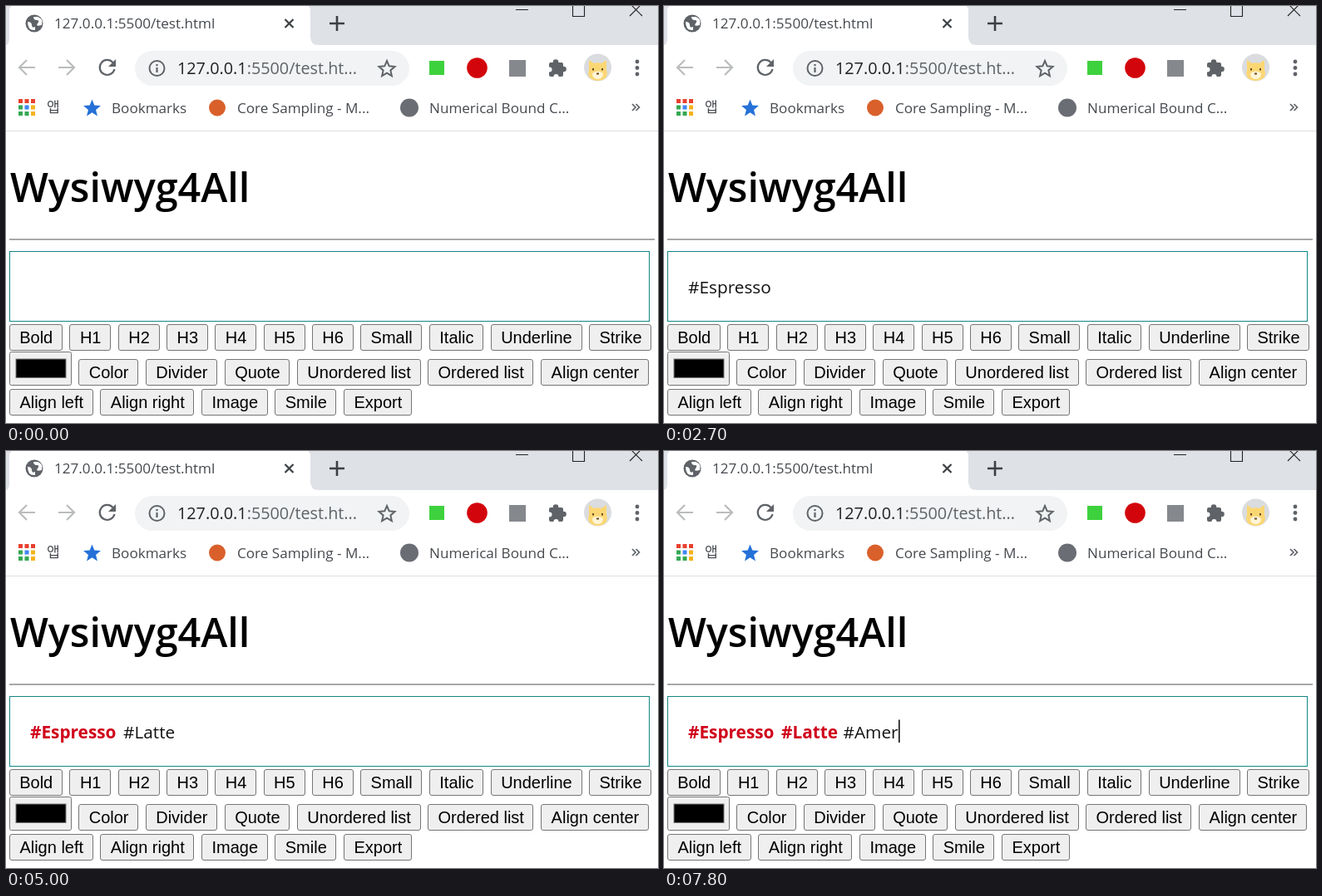
Recreate the animation shown at these times as an HTML page. Size 784 px wide and 502 px high, loop 8000 ms.

```html
<!DOCTYPE html>
<html lang="en">
<head>
<meta charset="utf-8">
<title>Editor demo</title>
<style>
  html, body { margin: 0; width: 100%; height: 100%; overflow: hidden; background: #fff; }
  svg { display: block; width: 784px; height: 502px; }
  text { white-space: pre; font-family: "Open Sans", "Noto Sans", "Noto Sans CJK KR", sans-serif; }
  .label { font-size: 17.1px; fill: #45494e; }
  .url { font-size: 19.8px; fill: #202124; }
  .heading { font-size: 48.5px; font-weight: 640; }
  .word { font-size: 20.8px; fill: #111; }
  .word.tag { font-weight: 700; fill: #d0021b; }
  .button text { font: 20px "Liberation Sans", Arial, sans-serif; }
  .button rect { fill: #efefef; stroke: #767676; }
  .line { fill: none; stroke: #5f6368; stroke-width: 2.2; }
  .faint { stroke: #babcbe; }
  .icon { fill: #5f6368; }
</style>
</head>
<body>
<svg id="stage" viewBox="0 0 784 502">
  <rect width="784" height="502" fill="#fff"/>

  <!-- Tab strip -->
  <rect width="784" height="47" fill="#dee1e6"/>
  <path d="M0 47Q4 46 4 39V6Q4 0 10 -2H360Q366 0 366 6V37Q366 47 376 47Z" fill="#fff"/>
  <circle class="icon" cx="34" cy="21" r="10.5"/>
  <path d="M26 19q5 0 5 4t4 2v4q-9 1 -9 -10M33 13q0 4 4 4t1 4t5 2q2 -8 -5 -10z" fill="#fff"/>
  <text class="label" x="58" y="27">127.0.0.1:5500/test.html</text>
  <path class="line" d="M335.500 16l10 10m0 -10l-10 10" style="stroke:#3c4043"/>
  <path class="line" d="M389 21h18M398 12v18" style="stroke:#3c4043;stroke-width:2.6"/>
  <path d="M613 4.500h15M681.500 -2v14.500h14V-2M750 -3l15 15m0 -15l-15 15" fill="none" stroke="#222" stroke-width="1.100"/>

  <!-- Toolbar -->
  <path class="line faint" d="M35 74H16m9 -9l-9 9l9 9M63 74h19m-9 -9l9 9l-9 9"/>
  <path class="line" d="M128.500 68a9 9 0 1 0 2 8"/>
  <path class="icon" d="M132 64v9h-9z"/>
  <rect x="155" y="54" width="330" height="42" rx="21" fill="#f1f3f4"/>
  <circle class="line" cx="181.500" cy="75" r="9" style="stroke-width:2"/>
  <path class="line" d="M181.500 74v6m0 -10v2.200"/>
  <text class="url" x="206" y="82">127.0.0.1<tspan fill="#5f6368">:5500/test.ht...</tspan></text>
  <path class="line" id="outlineStar" style="stroke-width:2"/>
  <rect x="509" y="66" width="18" height="17" fill="#3ed13e"/>
  <circle cx="566.500" cy="74.500" r="12.300" fill="#d3050c"/>
  <rect x="605" y="65" width="20" height="20" fill="#85888c"/>
  <g class="icon">
    <rect x="653" y="68" width="17" height="17" rx="2"/>
    <circle cx="661" cy="67.500" r="3.300"/>
    <circle cx="670.500" cy="76" r="3.300"/>
    <circle cx="653.500" cy="76.500" r="3" fill="#fff"/>
    <circle cx="661.500" cy="85" r="3" fill="#fff"/>
    <circle cx="759" cy="67" r="2.400"/>
    <circle cx="759" cy="74.500" r="2.400"/>
    <circle cx="759" cy="82" r="2.400"/>
  </g>
  <circle cx="711.500" cy="74" r="16.500" fill="#dadcdf"/>
  <path d="M701 65l6 4q4.500 -1.500 9 0l6 -4v12q3 7 -3 11q-7.500 4 -15 0q-6 -4 -3 -11z" fill="#fbd774"/>
  <path d="M705 81q6.500 -5 13 0q0 7 -6.500 7t-6.500 -7" fill="#fff4d6"/>
  <path d="M706 75v2.500m11 -2.500v2.500m-7 4h3" fill="none" stroke="#6b4a22" stroke-width="2"/>

  <!-- Bookmarks -->
  <g id="apps"></g>
  <text class="label" x="49" y="128" style="font-family:'Noto Sans CJK KR','Noto Sans CJK',sans-serif">앱</text>
  <path id="solidStar" fill="#2571d8"/>
  <text class="label" x="127" y="129">Bookmarks</text>
  <circle cx="254" cy="122.500" r="10" fill="#d9602b"/>
  <text class="label" x="278" y="129">Core Sampling - M...</text>
  <circle cx="485" cy="122.500" r="11" fill="#6a6d73"/>
  <text class="label" x="509" y="129">Numerical Bound C...</text>
  <path class="line" d="M753 118l4 4l-4 4m4.500 -8l4 4l-4 4" style="stroke-width:1.700"/>
  <path d="M0 150.500H784" stroke="#dcdee1"/>

  <!-- Page -->
  <text class="heading" x="5" y="236">Wysiwyg4All</text>
  <path d="M4 281H780" stroke="#a8a8a8" stroke-width="2"/>
  <rect x="4.500" y="295.500" width="769" height="84" fill="#fff" stroke="#128586"/>
  <g id="words"></g>
  <rect id="caret" y="323.500" width="1.600" height="27.500" fill="#111"/>
  <g id="buttons"></g>
  <g class="button">
    <rect x="4.500" y="416.500" width="74" height="40" rx="2"/>
    <rect x="12" y="425" width="60" height="22.500" style="fill:#000;stroke:#777"/>
  </g>
</svg>
<script>
const LOOP = 8000;
const $ = id => document.getElementById(id);

function add(parent, tag, attrs, text = "") {
  const el = document.createElementNS("http://www.w3.org/2000/svg", tag);
  for (const key in attrs) el.setAttribute(key, attrs[key]);
  el.textContent = text;
  parent.append(el);
  return el;
}

function star(cx, cy, outer, inner) {
  const points = Array.from({ length: 10 }, (_, i) => {
    const r = i % 2 ? inner : outer, a = i * Math.PI / 5;
    return [cx + r * Math.sin(a), cy - r * Math.cos(a)].map(v => v.toFixed(2));
  });
  return "M" + points.join("L") + "Z";
}
$("outlineStar").setAttribute("d", star(458, 76, 10, 4.6));
$("solidStar").setAttribute("d", star(103.5, 123.5, 11, 4.8));

const RED = "#e8402f", GREEN = "#34a853", BLUE = "#4285f4", AMBER = "#f5b31c";
[RED, RED, RED, GREEN, BLUE, AMBER, GREEN, GREEN, AMBER].forEach((fill, i) =>
  add($("apps"), "rect", { x: 15 + i % 3 * 7.5, y: 112 + Math.floor(i / 3) * 7.5, width: 5, height: 5, fill }));

const snap = v => Math.floor(v) + 0.5;

function buttonRow(x, y, labels) {
  for (const label of labels) {
    const g = add($("buttons"), "g", { class: "button" });
    const box = add(g, "rect", { y, height: 31, rx: 2.5 });
    const text = add(g, "text", { x: x + 12, y: y + 22.5 }, label);
    const width = text.getComputedTextLength() + 24;
    box.setAttribute("x", snap(x));
    box.setAttribute("width", Math.round(width - 1));
    x += width + 8.7;
  }
}
buttonRow(4.2, 383.5, ["Bold", "H1", "H2", "H3", "H4", "H5", "H6", "Small", "Italic", "Underline", "Strike"]);
buttonRow(87.7, 425.5, ["Color", "Divider", "Quote", "Unordered list", "Ordered list", "Align center"]);
buttonRow(4.4, 461.5, ["Align left", "Align right", "Image", "Smile", "Export"]);

// Time, typed text, caret shown. A word followed by a space becomes a tag.
const steps = [
  [0, "", false],
  [100, "", true],
  [600, "#", true],
  [1000, "#E", true],
  [1200, "#Es", true],
  [1400, "#Esp", true],
  [1600, "#Espr", true],
  [1800, "#Espre", true],
  [1900, "#Espres", true],
  [2000, "#Espress", true],
  [2100, "#Espresso", true],
  [2700, "#Espresso", false],
  [2800, "#Espresso ", true],
  [3100, "#Espresso #", true],
  [3600, "#Espresso #L", true],
  [3900, "#Espresso #La", true],
  [4200, "#Espresso #Lat", true],
  [4300, "#Espresso #Latt", true],
  [4400, "#Espresso #Latte", true],
  [5000, "#Espresso #Latte", false],
  [5400, "#Espresso #Latte ", true],
  [6100, "#Espresso #Latte ", false],
  [6700, "#Espresso #Latte #", true],
  [7200, "#Espresso #Latte #A", true],
  [7400, "#Espresso #Latte #Am", true],
  [7600, "#Espresso #Latte #Ame", true],
  [7800, "#Espresso #Latte #Amer", true]
];

const wordX = [29, 141, 215.5];
const words = wordX.map(x => add($("words"), "text", { class: "word", x, y: 346 }));
let shown;

function draw(step) {
  if (step === shown) return;
  shown = step;
  const [, typed, caretOn] = step;
  const parts = typed.split(" "), last = parts.length - 1;
  words.forEach((el, i) => {
    el.textContent = parts[i] || "";
    el.classList.toggle("tag", i < last);
  });
  const width = parts[last] ? words[last].getComputedTextLength() : 0;
  $("caret").setAttribute("x", Math.round(wordX[last] + width + 0.5));
  $("caret").setAttribute("visibility", caretOn ? "visible" : "hidden");
}

const start = performance.now();
function tick() {
  const t = (performance.now() - start) % LOOP;
  draw(steps.findLast(([at]) => at <= t));
  requestAnimationFrame(tick);
}
tick();
</script>
</body>
</html>
```
